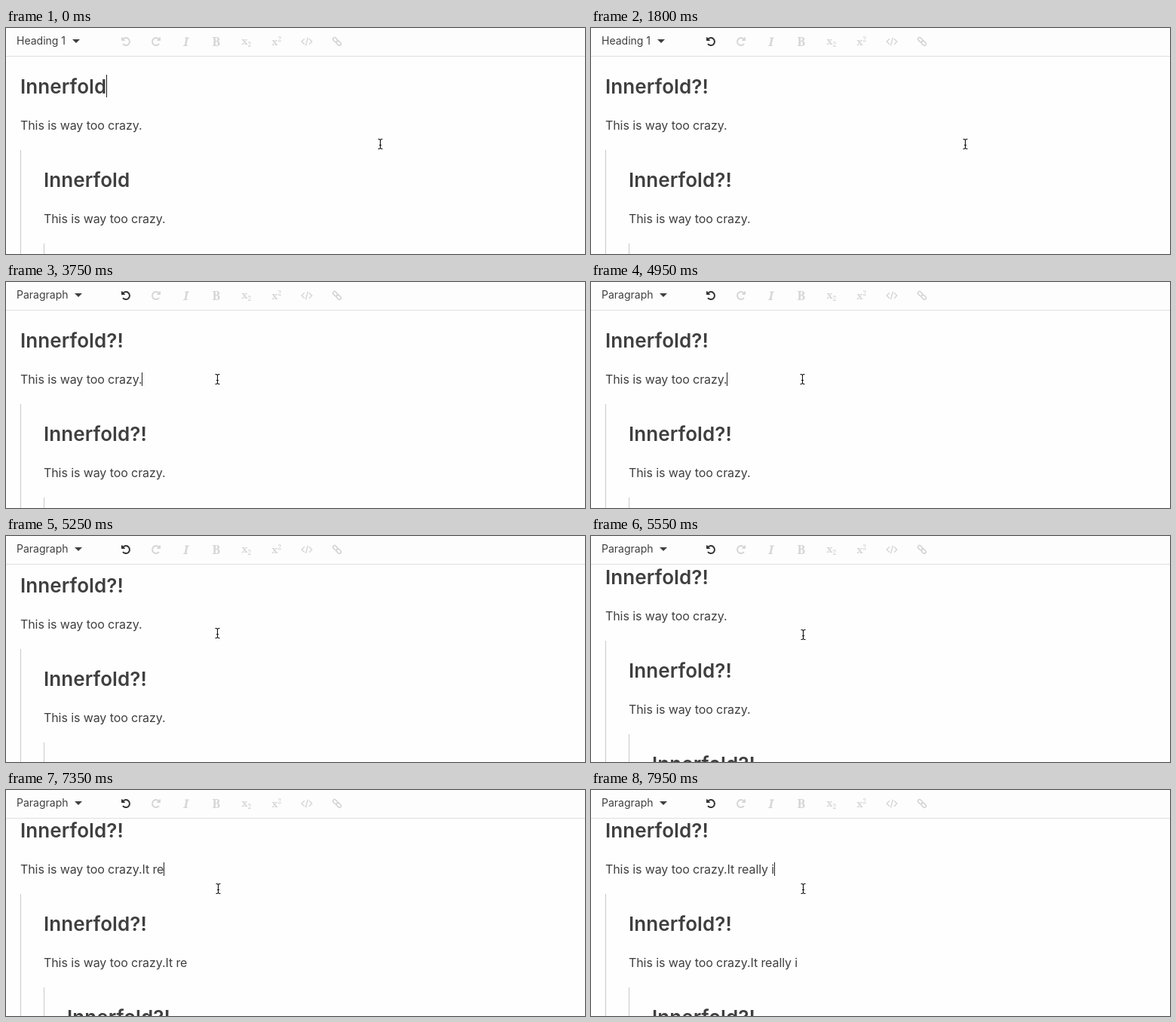
An HTML page for the animation above (8000 ms loop, 768x300 px).

```html
<!DOCTYPE html>
<html lang="en">
<head>
<meta charset="utf-8">
<title>Nested editor</title>
<style>
html, body { margin: 0; width: 100%; height: 100%; overflow: hidden; background: #fefefe; }
body { position: relative; color: #3f3f3f; font-family: Inter, "Open Sans", sans-serif; }
div, svg { position: absolute; white-space: pre; }
#bar { left: 0; top: 0; width: 100%; height: 37px; background: #fdfdfd; border-bottom: 1px solid #dfdfdf; }
#style { left: 14px; top: 8px; font-size: 14px; line-height: 18px; }
#drop { top: 15px; border: 5px solid transparent; border-top-color: #3f3f3f; border-bottom: 0; }
#page { left: 0; top: 0; width: 100%; height: 100%; }
.level { width: 700px; height: 400px; }
.head { left: 19px; top: 62px; font-size: 26px; line-height: 32px; font-weight: 600; letter-spacing: 0.08px; }
.para { left: 19px; top: 120px; font-size: 16px; line-height: 18px; letter-spacing: -0.09px; }
.rule { left: 19px; top: 162px; width: 1px; height: 400px; background: #c9c9c9; }
.caret { top: 0; width: 1px; height: 18px; left: 100%; background: #222; }
.head .caret { height: 30px; }
#icons, #mouse { left: 0; top: 0; }
#icons text { font: bold 16px "Noto Serif", serif; text-anchor: middle; }
</style>
</head>
<body>
<div id="page"></div>
<div id="bar">
  <div id="style"></div><div id="drop"></div>
  <svg id="icons" width="480" height="37" fill="#d6d6d6" stroke="none">
    <defs>
      <g id="turn">
        <path d="M3.6 3.4A5 5 0 1 1 3 10.1" fill="none" stroke="currentColor" stroke-width="2"/>
        <path d="M1 1.4V5.6Q1 6 1.4 6H5.6Q6.3 5.9 5.8 5.2L1.8 1.2Q1.2.8 1 1.4Z" fill="currentColor"/>
      </g>
      <rect id="ring" x="-3.4" y="-2.1" width="6.8" height="4.2" rx="2" fill="none" stroke="#d6d6d6" stroke-width="1.7"/>
    </defs>
    <use id="undo" href="#turn" x="152" y="11"/>
    <use href="#turn" transform="translate(206 11) scale(-1 1)" color="#d6d6d6"/>
    <path d="M237.4 12.5H243L242.8 13.5 241.3 14 239.4 22.4 240.8 23 240.6 24H235L235.2 23 236.9 22.4 238.7 14 237.2 13.5Z"/>
    <text x="279" y="24">B</text>
    <text x="316.5" y="22" style="font-size:13px">x</text>
    <text x="323" y="25" style="font-size:8px">2</text>
    <text x="356.5" y="23" style="font-size:13px">x</text>
    <text x="363" y="18" style="font-size:8px">2</text>
    <path d="M396 14.2L392.2 18 396 21.8M402 14.2L405.8 18 402 21.8M400.4 12.8L397.6 23.2" fill="none" stroke="#d6d6d6" stroke-width="1.4"/>
    <use href="#ring" transform="translate(436.7 15.6) rotate(45)"/>
    <use href="#ring" transform="translate(441.3 20.2) rotate(45)"/>
  </svg>
</div>
<svg id="mouse" width="768" height="300">
  <g id="beam" fill="none">
    <path d="M-3 -6.5H-1.5L0 -5.5 1.5 -6.5H3M0 -5.5V5.5M-3 6.5H-1.5L0 5.5 1.5 6.5H3M-1.5 1.5H1.5" stroke="#fff" stroke-width="2.6"/>
    <path d="M-3 -6.5H-1.5L0 -5.5 1.5 -6.5H3M0 -5.5V5.5M-3 6.5H-1.5L0 5.5 1.5 6.5H3M-1.5 1.5H1.5" stroke="#111" stroke-width="1.1"/>
  </g>
  <path id="arrow" d="M0 0V14.2L3.2 11.2 5.3 16 7.8 15 5.7 10.2H10.2Z" fill="#000" stroke="#fff" stroke-width="1"
    style="filter:drop-shadow(0 1px 1px rgba(0,0,0,.35))"/>
</svg>
<script>
const $ = id => document.getElementById(id);
const LOOP = 8000, DEPTH = 3;
const title = "Innerfold", line = "This is way too crazy.";

// Each track is a list of [start time, value].
const tracks = {
  mark: [[0, ""], [1050, "?"], [1200, "?!"]],
  tail: [[0, ""], [6450, "I"], [6750, "It"], [6900, "It "], [7350, "It re"], [7500, "It rea"],
         [7650, "It reall"], [7800, "It really "], [7950, "It really i"]],
  caret: [[0, 1], [150, 0], [750, 1], [1800, 0], [2250, 1], [2700, 0], [3300, 1],
          [4050, 0], [4650, 1], [5100, 0], [5700, 1], [6150, 0], [6450, 1]],
  inPara: [[0, false], [3600, true]],
  scroll: [[0, 0], [5100, 4], [5250, 12], [5400, 19], [5550, 23], [5700, 24]],
  mouse: [[0, [496.5, 154, "beam"]], [3000, [472, 182, "arrow"]], [3150, [438.5, 200, "arrow"]],
          [3300, [378, 184, "arrow"]], [3450, [312, 144, "beam"]], [3600, [282, 130, "beam"]],
          [3750, [280.5, 129, "beam"]], [5400, [281.5, 131, "beam"]]]
};
const at = (track, t) => track.findLast(step => step[0] <= t)[1];

function add(parent, cls) {
  const el = document.createElement("div");
  el.className = cls;
  return parent.appendChild(el);
}

function addText(parent, cls) {
  const box = add(parent, cls);
  const text = box.appendChild(document.createElement("span"));
  return { box, text };
}

const levels = Array.from({ length: DEPTH }, (_, i) => {
  const el = add($("page"), "level");
  el.style.transform = `translate(${31 * i}px, ${124 * i}px)`;
  add(el, "rule");
  return { head: addText(el, "head"), para: addText(el, "para") };
});
const headCaret = add(levels[0].head.box, "caret");
const paraCaret = add(levels[0].para.box, "caret");

function draw(t) {
  const now = {};
  for (const key in tracks) now[key] = at(tracks[key], t);

  for (const { head, para } of levels) {
    head.text.textContent = title + now.mark;
    para.text.textContent = line + now.tail;
  }
  headCaret.hidden = !now.caret || now.inPara;
  paraCaret.hidden = !now.caret || !now.inPara;
  $("page").style.top = -now.scroll + "px";
  $("style").textContent = now.inPara ? "Paragraph" : "Heading 1";
  $("drop").style.left = (now.inPara ? 91 : 88) + "px";
  $("undo").style.color = now.mark ? "#333" : "#d6d6d6";

  const [x, y, shape] = now.mouse;
  for (const id of ["beam", "arrow"]) {
    $(id).style.display = id === shape ? "" : "none";
    $(id).setAttribute("transform", `translate(${x} ${y})`);
  }
}

function tick() {
  draw(performance.now() % LOOP);
  requestAnimationFrame(tick);
}
tick();
</script>
</body>
</html>
```
